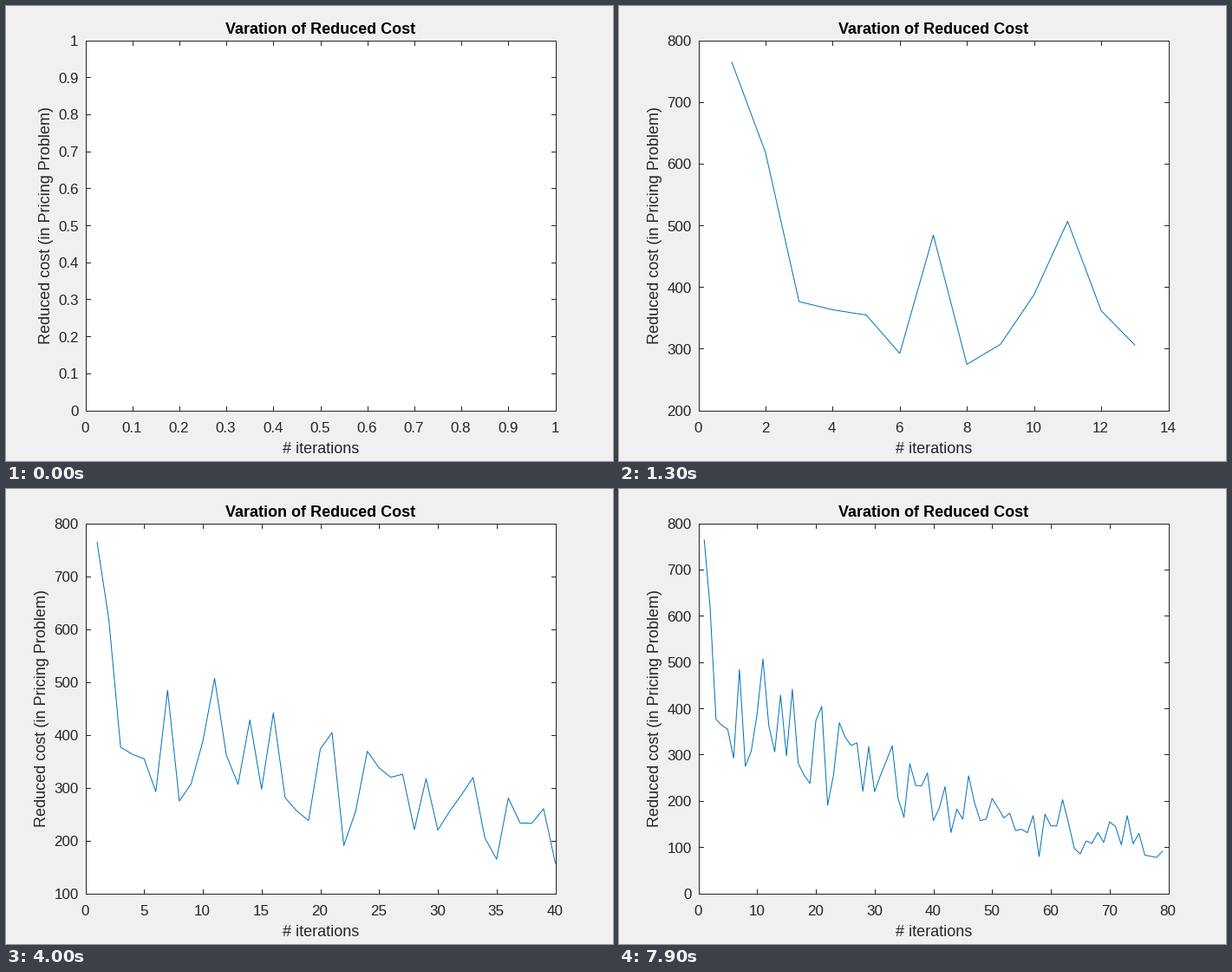
Animation, 700 px wide and 525 px high, one loop 8 s. Source, as a matplotlib script:

```python
import math

import matplotlib.pyplot as plt
from matplotlib.animation import FuncAnimation
from matplotlib.patches import Rectangle

W, H, DPI = 700, 525, 100
LEFT, RIGHT, TOP, BOTTOM = 91.5, 633.5, 39.5, 466.5
PX = 72 / DPI
INK = "#262626"
TICK = 5
TICK_FONT, LABEL_FONT = 17, 18

COSTS = [
    763.9, 618, 376.3, 363, 354.5, 292.2, 484, 274.5, 307, 387.5,
    506.5, 361.5, 306, 428, 297, 441, 281, 255.5, 237.5, 373,
    404, 190.5, 255, 368.8, 337, 319.5, 325.2, 220.5, 317, 219.5,
    255, 286, 319, 205, 164.5, 280.2, 233, 232.5, 260, 157,
    184, 230.5, 131.5, 182, 160, 254, 196, 157, 160.5, 205,
    185, 163, 173, 135.5, 138.5, 131, 168, 79.5, 171, 146,
    145.5, 202.5, 152, 97, 85, 113, 108, 131.5, 110, 154.5,
    144.5, 105, 168, 107, 129.5, 82.5, 80, 77.5, 91,
]

plt.rcParams["font.family"] = "Liberation Sans"
fig = plt.figure(figsize=(W / DPI, H / DPI), dpi=DPI, facecolor="#f0f0f0")
ax = fig.add_axes([0, 0, 1, 1])


def nice_ticks(lo, hi):
    """Finest 1-2-5 ticks that cover lo..hi in at most ten intervals."""
    for power in range(-2, 4):
        for base in (1, 2, 5):
            step = base * 10.0 ** power
            first = math.floor(lo / step + 1e-9)
            last = math.ceil(hi / step - 1e-9)
            if last - first <= 10:
                return [i * step for i in range(first, last + 1)]


def axis_ticks(values):
    if not values:
        return nice_ticks(0, 1)
    lo, hi = min(values), max(values)
    if lo == hi:
        lo, hi = lo - 1, hi + 1
    return nice_ticks(lo, hi)


def scaler(ticks, start, end):
    lo, hi = ticks[0], ticks[-1]
    return lambda v: start + (v - lo) / (hi - lo) * (end - start)


def text(x, y, string, size=TICK_FONT, ha="center", color=INK, **kwargs):
    ax.text(x, y, string, fontsize=size * PX, ha=ha, va="baseline",
            color=color, **kwargs)


def line(xs, ys, color=INK, **kwargs):
    ax.plot(xs, ys, color=color, lw=PX, **kwargs)


def text_width(string):
    return sum(0.278 if c == "." else 0.556 for c in string) * TICK_FONT


def draw(n):
    ax.cla()
    ax.set(xlim=(0, W), ylim=(H, 0))
    ax.axis("off")
    ax.add_patch(Rectangle((LEFT, TOP), RIGHT - LEFT, BOTTOM - TOP,
                           fc="white", ec="none"))

    xs, ys = list(range(1, n + 1)), COSTS[:n]
    xticks, yticks = axis_ticks(xs), axis_ticks(ys)
    to_x = scaler(xticks, LEFT, RIGHT)
    to_y = scaler(yticks, BOTTOM, TOP)

    line([to_x(x) for x in xs], [to_y(y) for y in ys], "#0072bd", zorder=2)

    for tick in xticks:
        x = to_x(tick)
        line([x, x], [BOTTOM, BOTTOM - TICK], zorder=3)
        line([x, x], [TOP, TOP + TICK], zorder=3)
        text(x - 0.5, 492, f"{tick:g}")
    for tick in yticks:
        y = to_y(tick)
        line([LEFT, LEFT + TICK], [y, y], zorder=3)
        line([RIGHT, RIGHT - TICK], [y, y], zorder=3)
        text(83.6, y + 6.5, f"{tick:g}", ha="right")
    line([LEFT, RIGHT, RIGHT, LEFT, LEFT], [TOP, TOP, BOTTOM, BOTTOM, TOP],
         zorder=3)

    middle = (LEFT + RIGHT) / 2
    text(middle + 0.5, 32, "Varation of Reduced Cost", LABEL_FONT,
         color="black", weight="bold")
    text(middle + 0.5, 516, "# iterations", LABEL_FONT)
    widest = max(text_width(f"{tick:g}") for tick in yticks)
    text(74.5 - widest, 253.5, "Reduced cost (in Pricing Problem)", LABEL_FONT,
         rotation=90, rotation_mode="anchor")


anim = FuncAnimation(fig, draw, frames=len(COSTS) + 1, init_func=lambda: None,
                     interval=100, repeat=True, repeat_delay=0)
plt.show()
```
